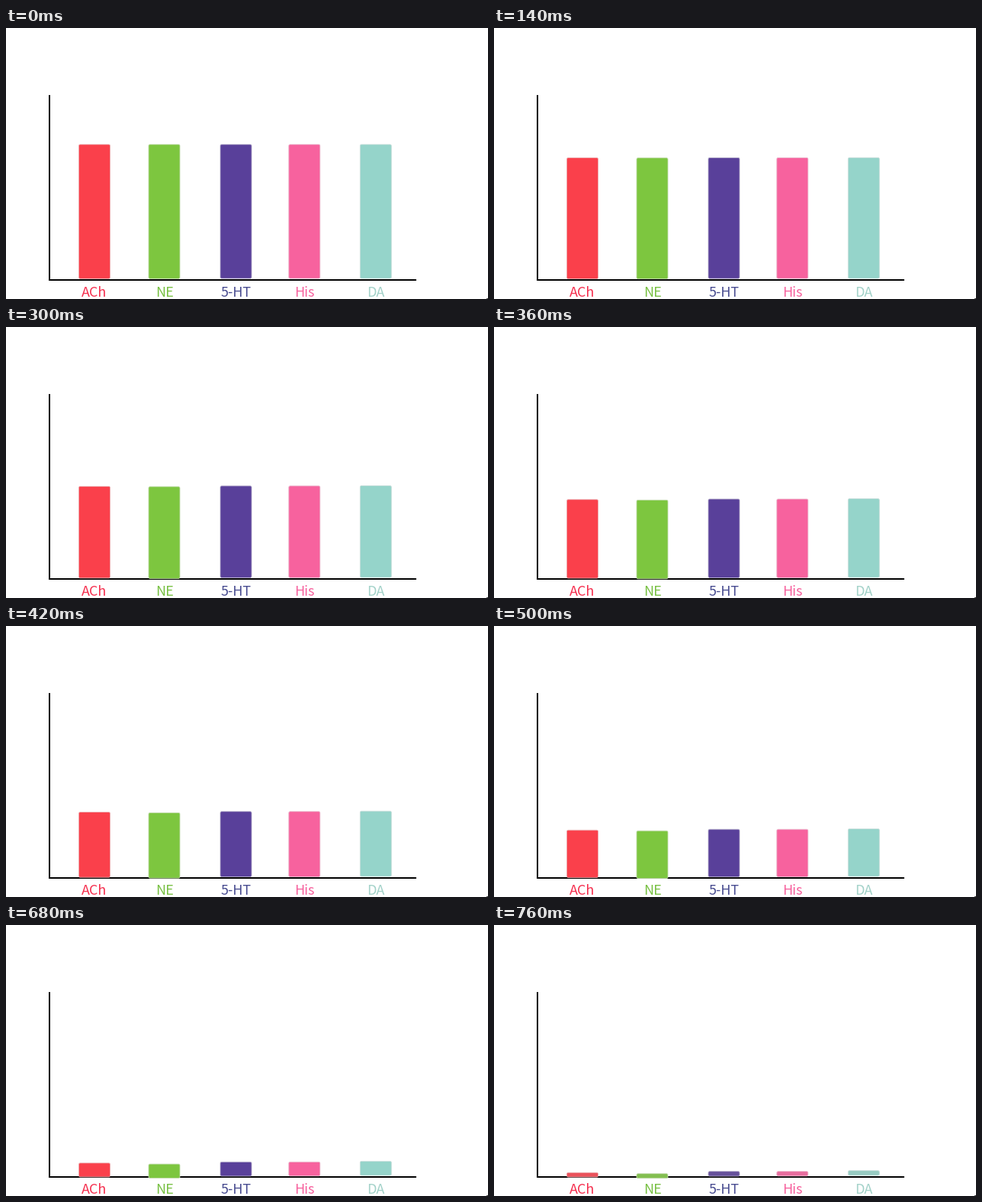
A matplotlib script for the animation above (0.78 s loop, 632 by 356 pixels).

```python
import numpy as np
import matplotlib.pyplot as plt
from matplotlib.animation import FuncAnimation
from matplotlib.colors import to_rgb
from matplotlib.patches import FancyBboxPatch, Rectangle

W, H, DPI = 632, 356, 100
FRAMES, STEP = 39, 20
BAR_W, TOP = 41, 153

# label, left edge, bar colour, label colour, final top, first and final bottom
BARS = [
    ("ACh", 95.5, "#fa404b", "#f5304f", 325.3, 329.3, 331.0),
    ("NE", 187.0, "#7dc63f", "#78c043", 326.7, 329.3, 332.7),
    ("5-HT", 281.0, "#59409a", "#484c90", 323.7, 329.0, 330.0),
    ("His", 370.8, "#f7629e", "#f7629e", 323.7, 329.0, 329.8),
    ("DA", 464.3, "#95d4ca", "#a3d2c9", 322.7, 329.0, 329.0),
]

# Slow start, steady middle, soft landing
KEY_TIMES = np.array([0, 140, 300, 420, 500, 600, 760]) / 760
KEY_DROPS = [0, 0.102, 0.327, 0.532, 0.668, 0.825, 1]
CURVE = np.polyfit(KEY_TIMES, KEY_DROPS, 4)


def mix(a, b, k):
    return tuple((1 - k) * np.array(to_rgb(a)) + k * np.array(to_rgb(b)))


def drop(i):
    return float(np.clip(np.polyval(CURVE, i / (FRAMES - 1)), 0, 1))


fig = plt.figure(figsize=(W / 100, H / 100), dpi=DPI, facecolor="white")
ax = fig.add_axes([0, 0, 1, 1])
ax.set_xlim(0, W)
ax.set_ylim(H, 0)
ax.axis("off")


def block(x, y, w, h, color):
    ax.add_patch(Rectangle((x, y), w, h, fc=color, lw=0, zorder=1))


block(56, 88, 2, 244, "black")
block(56, 330, 482, 2, "black")
block(630, 355, 2, 1, "#444444")

patches = []
for name, x, color, ink, *_ in BARS:
    bar = FancyBboxPatch((x, TOP), BAR_W, 176,
                         boxstyle="round,pad=0,rounding_size=1.8",
                         fc=color, ec=mix(color, "#e4e4e4", 0.65),
                         lw=0.6, zorder=2)
    patches.append(ax.add_patch(bar))
    ax.text(x + BAR_W / 2, 353, name, color=ink, ha="center", va="baseline",
            family="Noto Sans CJK JP", weight="light", size=18 * 72 / DPI)


def update(i):
    d = drop(i)
    fade = 0.18 * np.clip((d - 0.93) / 0.07, 0, 1)
    for bar, (_, x, color, _, end, low, low_end) in zip(patches, BARS):
        top = TOP + d * (end - TOP)
        bottom = low + d * (low_end - low)
        bar.set_bounds(x, top, BAR_W, bottom - top)
        bar.set_facecolor(mix(color, "#a0a0a0", fade))
    return patches


anim = FuncAnimation(fig, update, frames=FRAMES, interval=STEP,
                     repeat=True, repeat_delay=0, blit=False)
plt.show()
```
